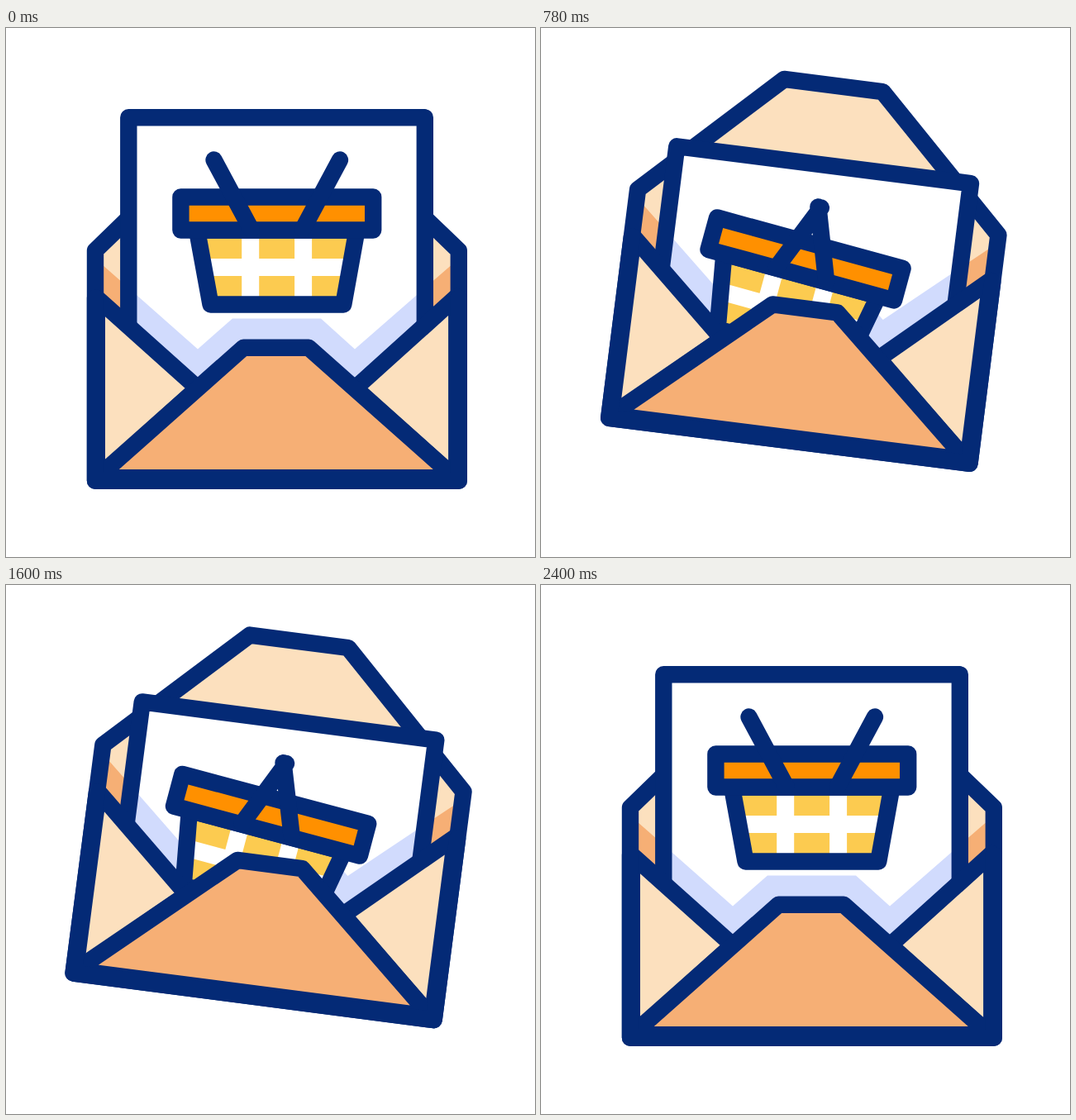
Write an HTML page that moves like this. It is 640 px wide and 640 px high and loops after 2420 ms.

```html
<!DOCTYPE html>
<html lang="en">
<head>
<meta charset="utf-8">
<title>Basket in an envelope</title>
<style>
html, body { margin: 0; width: 100%; height: 100%; overflow: hidden; background: #fff; }
svg { display: block; width: 100%; height: 100%; }
.line { stroke: #042a76; stroke-width: 20.4; stroke-linejoin: round; stroke-linecap: round; }
.open { fill: none; }
.light { fill: #fce0be; }
.peach { fill: #f6af75; }
.white { fill: #fff; }
.shade { fill: #d1dbfd; }
.orange { fill: #ff9000; }
.yellow { fill: #fccb50; }
.gap { fill: none; stroke: #fff; stroke-width: 21; }
</style>
</head>
<body>
<svg viewBox="0 0 640 640">
  <g id="envelope">
    <path class="light" d="M108 269.3L267 114.7H387L547.8 269.3V547.8H108Z"/>
    <path class="peach" d="M108 279L232 388H422L547.8 279V547.8H108Z"/>
    <path class="line open" d="M108 269.3L267 114.7H387L547.8 269.3V547.8H108Z"/>

    <path id="sheet" class="white" d="M148.3 445V108.3H506.8V445Z"/>
    <path class="shade" d="M148.3 314.5L232 388.5L274 351.5H381L422 388.5L506.8 314.5V445H148.3Z"/>
    <path id="frame" class="line open" style="stroke-linecap:butt" d="M148.3 445V108.3H506.8V445"/>

    <g id="basket">
      <path class="yellow" d="M231 244.5H424.5L408.3 334.5H247.5Z"/>
      <path class="gap" d="M295.7 245V334M359.6 245V334M238 289.5H418"/>
      <path class="line open" d="M231 244.5H424.5L408.3 334.5H247.5Z"/>
      <path class="line orange" d="M211.4 204.5H444.2V244.5H211.4Z"/>
      <path id="handles" class="line open"/>
    </g>

    <path class="line light" d="M109.8 326.5L232 435.8L109.8 546Z"/>
    <path class="line light" d="M545.3 325L422.5 435.8L545.3 546Z"/>
    <path class="line peach" d="M110 544.2L287.2 386.8H366.3L543.7 544.2Z"/>
    <path class="line open" d="M108 326.5V547.8H547.8V326.5"/>
  </g>
</svg>
<script>
const LOOP = 2420, END = 2400, HALF = END / 2;
const MID = 327.75, PIVOT = 168.5;
// swing of the basket: [time, degrees]
const SWING = [[175, 0], [680, 10], [1212, -10], [1710, 10], [2300, 0]];

const el = id => document.getElementById(id);
const envelope = el('envelope'), sheet = el('sheet'), frame = el('frame');
const basket = el('basket'), handles = el('handles');

const ease = x => {
  const u = Math.min(1, Math.max(0, x));
  return u * u * (3 - 2 * u);
};

function track(keys, t) {
  let value = keys[0][1];
  for (let i = 1; i < keys.length; i++) {
    const [t0, a] = keys[i - 1], [t1, b] = keys[i];
    if (t >= t0) value = a + (b - a) * ease((t - t0) / (t1 - t0));
  }
  return value;
}

function draw(time) {
  const t = Math.min(time % LOOP, END);
  const m = Math.min(t, END - t); // out and back
  const lift = ease(m / HALF);
  const slide = 103.3 * ease(m / 692);
  const close = ease(m / 300);

  envelope.setAttribute('transform',
    `translate(0 ${-65 * lift}) rotate(${10 * lift} 328 328)`);
  sheet.setAttribute('transform', `translate(0 ${slide})`);
  frame.setAttribute('transform', `translate(0 ${slide})`);
  basket.setAttribute('transform',
    `translate(0 ${slide}) rotate(${track(SWING, t)} ${MID} ${PIVOT})`);

  // the tips cross slightly when the handles are closed
  const reach = 76.2 - 78 * close;
  handles.setAttribute('d',
    `M${MID - reach} 159.6L${MID - 31.2} 243.5M${MID + reach} 159.6L${MID + 31.2} 243.5`);
}

function tick(now) {
  draw(now);
  requestAnimationFrame(tick);
}
draw(0);
requestAnimationFrame(tick);
</script>
</body>
</html>
```
